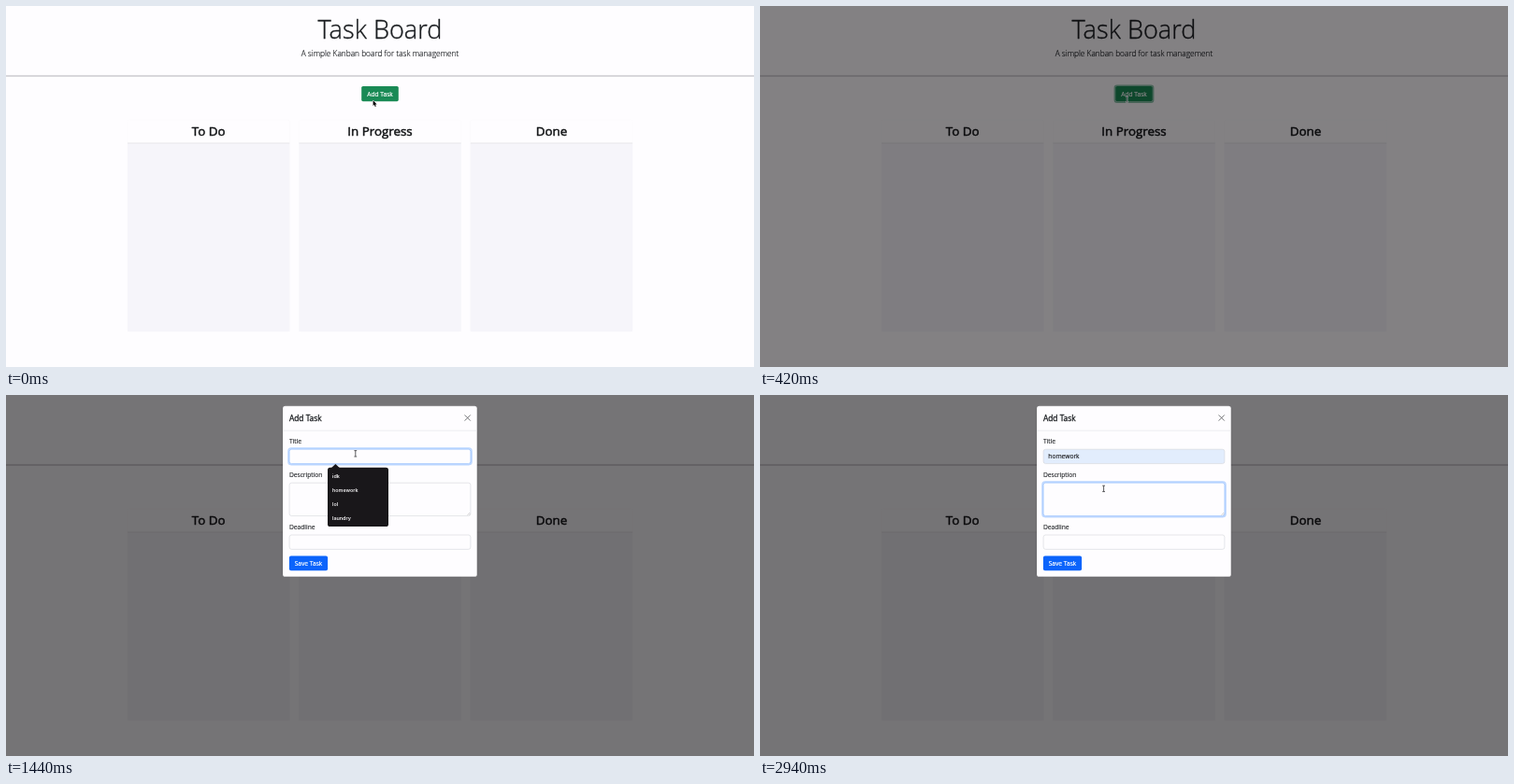
An HTML page with a canvas for the animation above (3 s loop, 800x387 px).

```html
<!DOCTYPE html>
<html lang="en">
<head>
<meta charset="utf-8">
<title>Task Board</title>
<style>
html, body { margin: 0; width: 100%; height: 100%; overflow: hidden; background: #fefdff; }
canvas { display: block; width: 800px; height: 387px; }
</style>
</head>
<body>
<canvas id="stage"></canvas>
<script>
const W = 800, H = 387, LOOP = 3000, TICK = 60;
const INK = '#1b1e21', PAPER = '#fefdff';
const SANS = '"Open Sans", "Noto Sans", sans-serif';
const MENU_FONT = 'Inter, Roboto, sans-serif';
const canvas = document.getElementById('stage');
const ctx = canvas.getContext('2d');
const dpr = window.devicePixelRatio || 1;
canvas.width = W * dpr;
canvas.height = H * dpr;

const clamp = v => Math.max(0, Math.min(1, v));
const ramp = (t, a, b) => clamp((t - a) / (b - a));
const smooth = k => k * k * (3 - 2 * k);
const mix = (a, b, k) => a + (b - a) * k;

function rect(x, y, w, h, fill) {
  ctx.fillStyle = fill;
  ctx.fillRect(x, y, w, h);
}

function box(x, y, w, h, r, fill, stroke, lw = 0.6) {
  ctx.beginPath();
  ctx.roundRect(x, y, w, h, r);
  if (fill) { ctx.fillStyle = fill; ctx.fill(); }
  if (stroke) { ctx.strokeStyle = stroke; ctx.lineWidth = lw; ctx.stroke(); }
}

function line(x1, y1, x2, y2, color, lw) {
  ctx.beginPath();
  ctx.moveTo(x1, y1);
  ctx.lineTo(x2, y2);
  ctx.strokeStyle = color;
  ctx.lineWidth = lw;
  ctx.stroke();
}

// A thin outline (grow) gives the slightly heavier letters of the page.
function text(str, x, y, size, { weight = 400, color = INK, align = 'left', family = SANS, grow = 0.12 } = {}) {
  ctx.font = `${weight} ${size}px ${family}`;
  ctx.textAlign = align;
  ctx.fillStyle = ctx.strokeStyle = color;
  ctx.lineWidth = grow;
  ctx.lineJoin = 'round';
  ctx.fillText(str, x, y);
  if (grow) ctx.strokeText(str, x, y);
}

function drawBoard(t) {
  rect(0, 0, W, H, PAPER);
  text('Task Board', 400, 35.3, 27.2, { weight: 300, align: 'center', grow: 0.35 });
  text('A simple Kanban board for task management', 400, 54.2, 8.33, { weight: 300, align: 'center', grow: 0.15 });
  rect(0, 74, W, 2, '#d8d7db');

  const light = 32 - 3 * ramp(t, 0, 120) - 5 * ramp(t, 240, 300) + 8 * ramp(t, 360, 420);
  if (t >= 300) box(379.4, 85.3, 41.2, 17.8, 2.4, null, 'rgba(60,153,110,.6)', 1.6);
  box(380.2, 86, 39.6, 16.2, 1.6, `hsl(152 69% ${light}%)`);
  text('Add Task', 400, 96.7, 6.67, { color: '#fff', align: 'center', grow: 0.2 });

  ['To Do', 'In Progress', 'Done'].forEach((name, i) => {
    const x = 130 + i * 183.4;
    box(x, 122, 173.3, 227, 1.5, null, 'rgba(0,0,0,.025)', 0.5);
    rect(x, 147, 173.3, 202, '#f6f5fa');
    rect(x, 146.6, 173.3, 0.8, '#e0e0e4');
    text(name, x + 86.6, 138.7, 13.33, { align: 'center', color: '#121416', grow: 0.5 });
  });
}

function field(y, h, focus, fill = PAPER) {
  if (focus) box(302.1, y - 0.8, 195.8, h + 1.6, 3, null, `rgba(13,110,253,${0.27 * focus})`, 1.7);
  box(303.1, y + 0.2, 193.8, h - 0.4, 2.4, fill, focus ? '#86b7fe' : '#d3d6db');
}

function drawModal(t) {
  const alpha = ramp(t, 450, 600);
  if (!alpha) return;
  const filled = t >= 1560;
  const leave = ramp(t, 1860, 2040);

  ctx.save();
  ctx.globalAlpha = alpha;
  ctx.translate(0, -20.8 * (1 - ramp(t, 450, 750)) ** 2.2);
  box(296, 11.8, 207.8, 183, 2.6, PAPER, 'rgba(0,0,0,.2)', 0.4);
  text('Add Task', 303, 27.5, 8.33, { grow: 0.3 });
  for (const s of [-3.1, 3.1]) line(493.7 - s, 21.4, 493.7 + s, 27.6, '#5c5d60', 0.85);
  rect(296.2, 37.8, 207.4, 0.6, '#dee2e6');

  text('Title', 302.9, 52, 6.67);
  field(58, 15.8, ramp(t, 900, 1080) - leave, filled ? '#e2edfd' : PAPER);
  if (filled) text('homework', 308.3, 68.3, 6.67, { color: '#111' });

  text('Description', 302.9, 88, 6.67);
  field(94, 35.8, leave);
  for (const s of [1.2, 2.8]) line(496.2 - s, 128.8, 496.2, 128.8 - s, '#999', 0.4);

  text('Deadline', 302.9, 144, 6.67);
  field(149.8, 15.8, 0);
  box(302.9, 172.4, 41.2, 15.8, 2, '#0b64fb');
  text('Save Task', 323.5, 182.7, 6.67, { color: '#fff', align: 'center', grow: 0.2 });

  const caret = clamp(0.3 + 2 * Math.cos((t - 2220) / 540 * Math.PI * 2));
  if (t >= 2040) rect(308.3, 97.3, 0.7, 8.6, `rgba(30,32,36,${caret})`);
  ctx.restore();
}

function drawMenu(t) {
  const alpha = ramp(t, 1200, 1320) - ramp(t, 1680, 1770);
  if (!alpha) return;
  ctx.save();
  ctx.globalAlpha = alpha;
  ctx.beginPath();
  ctx.moveTo(347.8, 78.2);
  ctx.lineTo(352.4, 74);
  ctx.lineTo(357, 78.2);
  ctx.fillStyle = '#19171a';
  ctx.fill();
  box(344, 77.8, 65, 63.2, 2.6, '#19171a');
  const hover = Math.floor((cursorAt(t).y - 79.4) / 15);
  ['idk', 'homework', 'lol', 'laundry'].forEach((word, i) => {
    const y = 86.9 + i * 15;
    if (i === hover) box(346, y - 6.6, 61, 13.2, 1.8, '#2a62cf');
    text(word, 349, y + 1.9, 5.4, { weight: 600, color: '#f2f1f3', family: MENU_FONT, grow: 0 });
  });
  ctx.restore();
}

// Each move glides on from the previous resting point.
const MOVES = [
  { from: 0, to: 120, x: 392.6, y: 100 },
  { from: 420, to: 780, x: 379, y: 79.7 },
  { from: 780, to: 1080, x: 373.8, y: 62.8 },
  { from: 1440, to: 1680, x: 361, y: 101.5 },
  { from: 1800, to: 2040, x: 367.6, y: 100.4 }
];

function cursorAt(t) {
  return MOVES.reduce((p, m) => {
    const k = smooth(ramp(t, m.from, m.to));
    return { x: mix(p.x, m.x, k), y: mix(p.y, m.y, k) };
  }, { x: 392.6, y: 101.2 });
}

const ARROW = new Path2D('M0 0V5.8L1.3 4.6L2.2 6.8L3.2 6.4L2.3 4.3L4.1 4.2Z');

function arrow(x, y) {
  ctx.save();
  ctx.translate(x, y);
  ctx.lineJoin = 'round';
  ctx.strokeStyle = '#fff';
  ctx.lineWidth = 0.9;
  ctx.stroke(ARROW);
  ctx.fillStyle = '#000';
  ctx.fill(ARROW);
  ctx.restore();
}

function beam(x, y) {
  for (const [color, lw] of [['rgba(255,255,255,.75)', 1.5], ['#26262a', 0.75]]) {
    line(x, y - 3, x, y + 3, color, lw);
    for (const s of [-3.2, 3.2]) line(x - 1.4, y + s, x + 1.4, y + s, color, lw);
  }
}

function drawCursor(t) {
  const { x, y } = cursorAt(t);
  const overText = (t >= 420 && t < 600) || (t >= 900 && t < 1500) || t >= 1740;
  (overText ? beam : arrow)(x, y);
}

function draw(t) {
  ctx.setTransform(dpr, 0, 0, dpr, 0, 0);
  drawBoard(t);
  rect(0, 0, W, H, `rgba(3,0,3,${0.54 * ramp(t, 338, 428)})`);
  drawModal(t);
  drawMenu(t);
  drawCursor(t);
}

const start = performance.now();
function loop() {
  const t = (performance.now() - start) % LOOP;
  draw(Math.floor(t / TICK) * TICK);
  requestAnimationFrame(loop);
}
loop();
</script>
</body>
</html>
```
